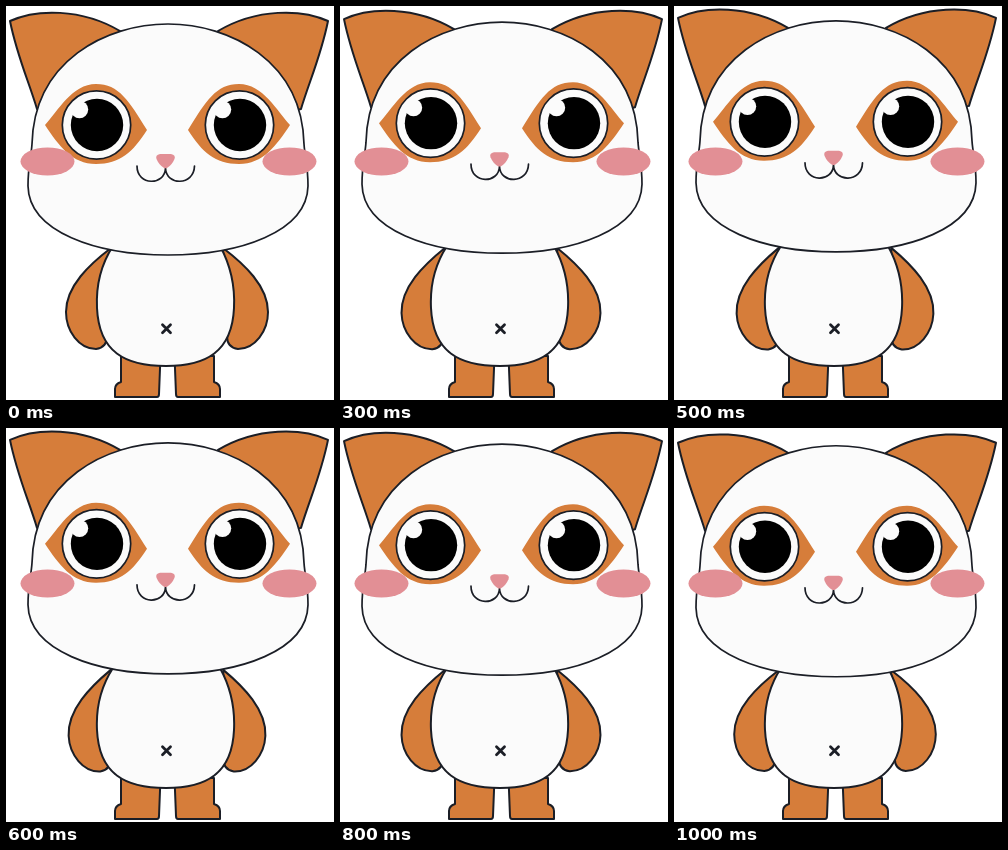
An HTML page that plays this animation: 328x394 px, repeating every 1.1 s.

```html
<!DOCTYPE html>
<html lang="en">
<head>
<meta charset="utf-8">
<title>Breathing cat</title>
<style>
  html, body { margin: 0; width: 100%; height: 100%; overflow: hidden; background: #fff; }
  svg { display: block; width: 328px; height: 394px; --lift: 0; }
  .line { stroke: #1b1e26; stroke-width: 2; stroke-linejoin: round; stroke-linecap: round; }
  .thin { stroke-width: 1.7; }
  .fur { fill: #d67d3a; }
  .white { fill: #fbfbfb; }
  .pink { fill: #e28f95; }
  .open { fill: none; }
  #head { transform: translateY(calc(var(--lift) * -3.2px)); }
  .arm { transform-origin: 102px 248px; transform: rotate(calc(var(--lift) * -2.6deg)); }
</style>
</head>
<body>
<svg viewBox="0 0 328 394">
  <defs>
    <path id="leg" class="fur line" d="M115 350V376Q109 378 109 383V391H151Q153 391 153 388L154.500 350Z"/>
    <path id="arm" class="fur line arm" d="M105 242C84 258 60 280 60 306C60 325 73 343 90 343C98 342 101 337 101 330Z"/>
    <path id="ear" class="fur line" d="M4 15C30 3 75 2 114 25L60 110L31 103C23 76 11 50 4 15Z"/>
    <path id="patch" class="fur" d="M39 119C52 105 66 78 90 78C113 78 123 95 141 124C127 146 114 158 90 158C66 158 53 140 39 119Z"/>
    <g id="eye">
      <circle class="white line thin" cx="90.500" cy="119" r="34.200"/>
      <circle cx="91" cy="119" r="26.200"/>
      <circle class="white" cx="73.500" cy="103.500" r="8.700"/>
    </g>
  </defs>

  <use href="#leg"/>
  <use href="#leg" transform="translate(323 0) scale(-1 1)"/>
  <use href="#arm"/>
  <use href="#arm" transform="translate(322 0) scale(-1 1)"/>

  <path class="white line" d="M107 240C94 260 90 282 91 302C93 346 119 360 160 360C200 360 226 346 228 302C229 282 225 260 214 240Z"/>
  <path class="open line" stroke-width="3" style="stroke-width:2.800" d="M156.500 318.800L164.500 326.800M164.500 318.800L156.500 326.800"/>

  <g id="head">
    <use href="#ear"/>
    <use href="#ear" transform="translate(326 0) scale(-1 1)"/>
    <path class="white line thin" d="M162 18C100 18 28 55 26 138C25 152 22 160 22 180C23 226 90 249 162 249C234 249 301 226 302 180C302 160 299 152 298 138C296 55 224 18 162 18Z"/>
    <use href="#patch"/>
    <use href="#patch" transform="translate(323 0) scale(-1 1)"/>
    <use href="#eye"/>
    <use href="#eye" x="143"/>
    <path class="open line thin" d="M131 160C131 180 159 180 159.500 162C160 180 188 180 188.500 160"/>
    <path class="pink" d="M154 148H165Q170 149 168.500 153Q166 159 161 162Q159.500 162.500 158 162Q153 159 150.500 153Q149 149 154 148Z"/>
  </g>

  <ellipse class="pink" cx="41.500" cy="155.500" rx="27" ry="14"/>
  <ellipse class="pink" cx="283.500" cy="155.500" rx="27" ry="14"/>
</svg>
<script>
  const LOOP = 1100, STEP = 100;
  const cat = document.querySelector('svg');
  const start = performance.now();

  // One slow breath, held in steps.
  function draw(now) {
    const t = Math.max(0, now - start) % LOOP;
    const phase = Math.floor(t / STEP) * STEP / LOOP;
    cat.style.setProperty('--lift', (1 - Math.cos(2 * Math.PI * phase)) / 2);
    requestAnimationFrame(draw);
  }
  draw(start);
</script>
</body>
</html>
```
